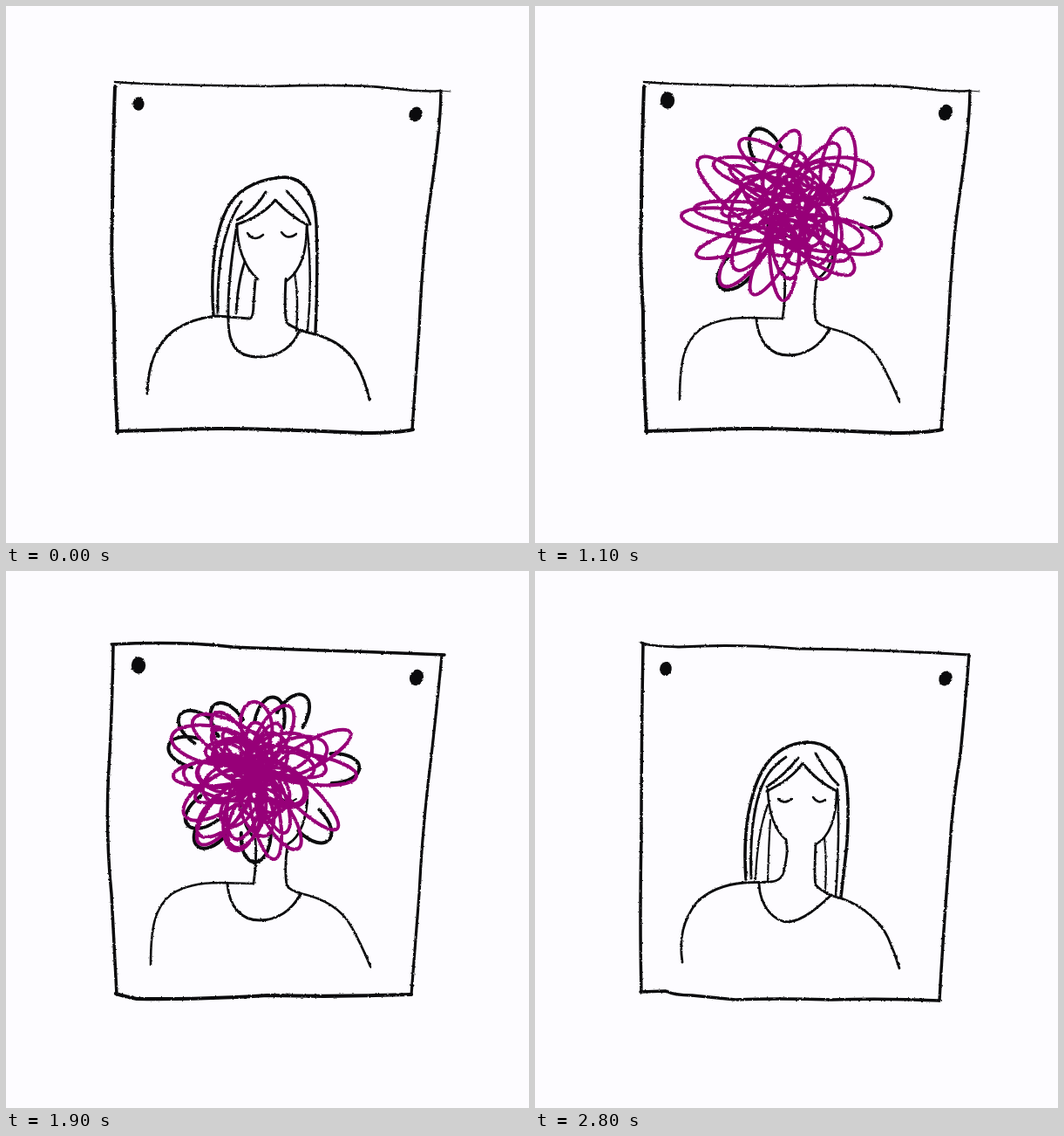
An HTML page for the animation above (2.9 s loop, 600 by 615 pixels).

```html
<!DOCTYPE html>
<html lang="en">
<head>
<meta charset="utf-8">
<title>Tangled portrait</title>
<style>
  html, body { margin: 0; width: 100%; height: 100%; overflow: hidden; background: #fdfcff; }
  svg { display: block; width: 600px; height: 615px; }
</style>
</head>
<body>
<svg viewBox="0 0 600 615" fill="none" stroke-linecap="round" stroke-linejoin="round">
  <filter id="pencil" filterUnits="userSpaceOnUse" x="0" y="0" width="600" height="615" color-interpolation-filters="sRGB">
    <feTurbulence type="fractalNoise" baseFrequency=".35" numOctaves="2" seed="4"/>
    <feDisplacementMap in="SourceGraphic" scale="2.4" xChannelSelector="R" yChannelSelector="G"/>
  </filter>
  <g id="art" filter="url(#pencil)"></g>
</svg>
<script>
const INK = '#0b0b0d', PLUM = '#970078';
const STEP = 100, COUNT = 29;
const art = document.getElementById('art');

const line = (d, width, color = INK) => `<path d="${d}" stroke="${color}" stroke-width="${width}"/>`;
const lines = list => list.map(([width, d]) => line(d, width)).join('');
const pin = (x, y, r, tilt) =>
  `<ellipse cx="${x}" cy="${y}" rx="${r}" ry="${r * 1.18}" fill="${INK}" transform="rotate(${tilt} ${x} ${y})"/>`;

const papers = {
  A: [
    [2.6, 'M125 87Q150 89 190 90T300 92Q400 89 440 94T498 97'],
    [1, 'M498 97L510 98'],
    [3.4, 'M499 97C498 160 485 220 481 265Q476 320 474 370L466 485'],
    [4, 'M467 485Q450 489 410 489Q350 486 300 485Q240 483 200 485L127 487'],
    [4, 'M125 92Q122 180 122 240Q120 290 124 350Q124 420 128 489']
  ],
  B: [
    [3, 'M122 82Q130 86 165 87Q230 83 300 89Q400 90 498 96'],
    [3.4, 'M498 96Q493 160 488 210Q478 270 475 330Q468 420 464 492'],
    [3.5, 'M464 492Q400 489 340 491Q280 489 230 491Q200 488 180 486Q160 486 150 481L121 482'],
    [3.5, 'M124 83Q122 200 122 300Q120 400 122 482']
  ],
  C: [
    [3, 'M124 87Q180 84 250 86Q330 90 400 94L501 98'],
    [3.5, 'M500 98Q494 190 483 260Q474 330 470 390L463 480'],
    [4, 'M461 486Q400 483 350 480Q280 480 220 484Q160 481 123 479'],
    [3.4, 'M124 87Q121 180 122 240Q115 310 119 370L124 482']
  ],
  D: [
    [3.5, 'M121 84Q200 80 260 87Q350 91 400 92L503 96'],
    [3.2, 'M500 96Q495 150 487 220Q478 290 474 370L465 485'],
    [4.2, 'M465 485Q380 488 300 486Q220 491 150 490Q135 487 126 484'],
    [3.5, 'M123 86Q122 150 119 210Q113 290 121 370L127 485']
  ]
};
const paperOrder = 'AADCCBBABD';

const bodies = {
  first: [
    [3, 'M162 444C163 410 172 388 192 372Q215 357 242 355L279 358Q284 358 284 340L286 314'],
    [3, 'M321 313Q319 350 322 363Q335 372 351 375C380 382 395 398 402 410Q412 428 417 451'],
    [3, 'M255 358C255 390 265 402 291 402C315 402 330 388 336 373'],
    [2.8, 'M265 250C265 275 273 299 289 313M345 253C345 278 339 302 323 314'],
    [2.6, 'M277 260Q284 271 295 262M316 259Q323 269 333 261']
  ],
  main: [
    [2.6, 'M166 451C166 410 170 385 190 370Q210 357 245 357L284 358'],
    [2.6, 'M337 369C365 375 385 387 396 407Q408 428 418 453'],
    [3, 'M254 358C256 385 270 400 291 400C312 400 328 388 338 370'],
    [2.8, 'M267 250C268 277 274 296 286 307Q288 330 284 358'],
    [2.8, 'M346 252C346 282 338 305 323 313Q319 340 322 360Q326 366 338 369'],
    [2, 'M277 261Q284 268 295 261M316 260Q324 268 333 261']
  ],
  last: [
    [2.8, 'M169 448C165 420 170 400 185 380Q205 360 240 357L270 356Q285 355 286 340Q291 322 288 308'],
    [2.8, 'M322 313Q320 350 322 360Q335 372 352 375C380 385 398 405 405 420Q413 438 418 455'],
    [2.8, 'M257 358C258 385 275 402 291 402C308 400 325 385 340 371'],
    [2.6, 'M267 250C268 277 274 296 288 308M346 252C346 282 338 305 322 313'],
    [2.5, 'M279 261Q286 268 294 261M319 259Q325 268 333 262']
  ]
};

const pins = {
  first: pin(152, 112, 6.6, 0) + pin(470, 124, 7.4, 30),
  main: pin(152, 108, 8.2, 0) + pin(471, 122, 7.9, 20),
  last: pin(150, 112, 6.8, 10) + pin(471, 123, 7.4, 30)
};

const hair = {
  first: [
    [3.4, 'M238 354C234 300 240 252 258 225C270 207 295 197 320 196C345 198 355 220 356 250Q358 310 355 374'],
    [3, 'M243 352C242 300 248 255 270 224M255 358C254 310 262 270 265 250M264 352Q266 315 274 293'],
    [2.5, 'M345 250Q352 310 346 372M333 372Q336 335 331 305'],
    [3, 'M265 250Q295 240 309 222Q325 240 346 251M265 245Q285 235 298 213M322 212Q345 235 349 250']
  ],
  last: [
    [3.6, 'M242 353C238 300 246 250 265 222C278 204 295 197 312 196C335 196 352 210 357 238C360 260 360 300 356 330L351 373'],
    [3, 'M248 352C246 300 252 255 268 232Q275 222 288 213'],
    [2.2, 'M253 353Q255 300 267 268M267 355Q268 315 270 285M333 365Q335 335 332 305'],
    [2.6, 'M347 250Q350 300 345 372'],
    [3, 'M266 252Q295 238 307 220Q322 240 346 252M266 247Q285 235 302 214M322 209Q335 233 348 245']
  ]
};

// Each tangle: core centre and spread, loop tips around the rim, number of inner loops.
const tangles = {
  curls: {
    core: [306, 222, 48, 20], inner: 20, width: 4.2, color: INK,
    tips: '205,185 232,168 208,262 230,285 257,298 293,148 316,157 343,158 364,170 380,235 357,292 372,250'
  },
  wide: {
    core: [308, 243, 34, 55], inner: 26, width: 4, color: PLUM,
    tips: '185,178 177,235 180,278 200,320 236,325 265,325 297,337 330,318 355,308 387,303 397,265 422,228 355,142 320,150 288,138 225,168',
    under: '267,141 207,321'
  },
  round: {
    core: [300, 228, 42, 44], inner: 22, width: 4, color: PLUM,
    tips: '168,240 188,175 185,285 215,320 250,330 285,337 330,313 365,305 397,275 388,190 355,140 300,143 235,155 205,180',
    under: '252,142 408,240 213,322'
  },
  dense: {
    core: [291, 229, 18, 28], inner: 30, width: 4, color: PLUM,
    tips: '192,235 190,190 205,280 222,312 262,320 308,330 335,318 380,295 402,235 395,185 325,155 283,150 240,163 215,170',
    under: '187,200 200,165 240,153 308,145 342,143 405,225 370,308 285,333 208,290 220,315'
  }
};

const random = seed => () => {
  seed = seed + 0x6D2B79F5 | 0;
  let t = Math.imul(seed ^ seed >>> 15, 1 | seed);
  t = t + Math.imul(t ^ t >>> 7, 61 | t) ^ t;
  return ((t ^ t >>> 14) >>> 0) / 4294967296;
};
const points = text => text.split(' ').map(p => p.split(',').map(Number));

// A long oval from a random spot in the core out to its tip.
function loop([x, y], [cx, cy, rx, ry], rnd) {
  const a = rnd() * 2 * Math.PI, r = Math.sqrt(rnd());
  const px = cx + Math.cos(a) * r * rx, py = cy + Math.sin(a) * r * ry;
  const half = Math.hypot(x - px, y - py) / 2;
  const wide = Math.min(13 + 9 * rnd(), half * .8 + 4);
  const arc = `A${half} ${wide} ${Math.atan2(y - py, x - px) * 180 / Math.PI} 0 1 `;
  return `M${px} ${py}${arc}${x} ${y}${arc}${px} ${py}`;
}

// Only the rounded end of a loop, peeping out at the rim.
function cap([x, y], [cx, cy]) {
  const a = Math.atan2(y - cy, x - cx), c = Math.cos(a), s = Math.sin(a);
  const at = (out, side) => `${x + c * out - s * side} ${y + s * out + c * side}`;
  return `M${at(-32, -17)}C${at(11, -17)} ${at(11, 17)} ${at(-32, 17)}`;
}

function tangle(name, part, seed) {
  const { core, tips, under, inner, width, color } = tangles[name];
  const rnd = random(seed * 97 + 11);
  const rim = points(tips), all = [...rim];
  for (let i = 0; i < inner; i++) {
    const [x, y] = rim[i * 5 % rim.length], k = .45 + .48 * rnd();
    all.push([core[0] + (x - core[0]) * k + 16 * (rnd() - .5), core[1] + (y - core[1]) * k + 16 * (rnd() - .5)]);
  }
  const drawn = all.filter((_, i) => i * 7 % all.length < all.length * part);
  const below = under ? line(points(under).map(p => cap(p, core)).join(''), width) : '';
  return below + line(drawn.map(p => loop(p, core, rnd)).join(''), width, color);
}

// First step of each stage, then the tangles drawn, as [name, part].
const stages = [
  [0], [3, ['curls', .4]], [4, ['curls', .7]], [5, ['curls', 1]],
  [7, ['curls', 1], ['wide', .5]], [8, ['wide', 1]], [11, ['round', 1]], [16, ['dense', 1]],
  [21, ['curls', 1]], [22, ['curls', .7]], [23, ['curls', .4]], [24]
];

function draw(step) {
  const pose = step < 3 ? 'first' : step < 26 ? 'main' : 'last';
  const [, ...knots] = stages.filter(s => s[0] <= step).pop();
  const top = knots.length
    ? knots.map(([name, part]) => tangle(name, part, step)).join('')
    : lines(hair[step < 3 ? 'first' : 'last']);
  art.innerHTML = lines(papers[paperOrder[step % 10]]) + pins[pose] + lines(bodies[pose]) + top;
}

const start = performance.now();
let shown = -1;
function tick() {
  const step = Math.floor((performance.now() - start) / STEP) % COUNT;
  if (step !== shown) draw(shown = step);
  requestAnimationFrame(tick);
}
tick();
</script>
</body>
</html>
```
